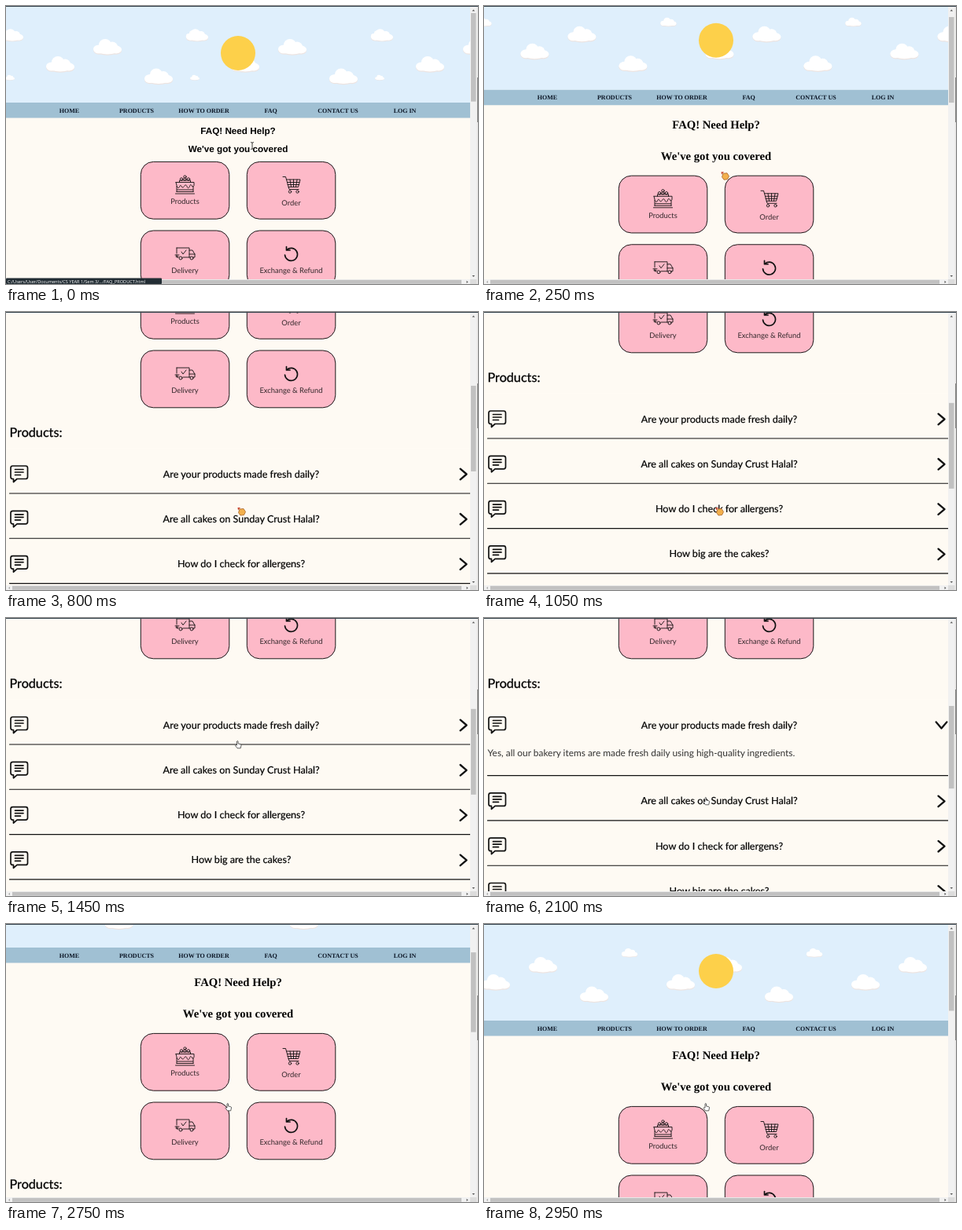
Recreate the animation shown at these times as an HTML page. Size 600 px wide and 354 px high, loop 3000 ms.

```html
<!DOCTYPE html>
<html lang="en">
<head>
<meta charset="utf-8">
<title>Bakery FAQ</title>
<style>
html, body { margin: 0; width: 100%; height: 100%; overflow: hidden; background: #fefaf3; }
svg { display: block; width: 600px; height: 354px; }
text { font-family: Lato, "Open Sans", sans-serif; fill: #111; text-rendering: geometricPrecision; }
.mid { text-anchor: middle; }
.nav { font: bold 8px "Liberation Serif", serif; fill: #0c1626; }
.plain { font: bold 11.7px "Liberation Sans", sans-serif; fill: #000; }
.fancy { font: bold 14.7px "Liberation Serif", serif; fill: #000; }
.label { font-size: 9.4px; fill: #33282b; }
.title { font-size: 16.2px; fill: #000; stroke: #000; stroke-width: .3; }
.question { font-size: 12.6px; fill: #000; stroke: #000; stroke-width: .2; }
.answer { font-size: 11.9px; fill: #333; }
.status { font: 5.6px "Open Sans", sans-serif; fill: #fff; }
.card { fill: #fdb9c8; stroke: #1c1719; stroke-width: 1; }
.line { fill: none; stroke: #111; stroke-linecap: round; stroke-linejoin: round; }
</style>
</head>
<body>
<svg viewBox="0 0 600 354">
  <defs>
    <clipPath id="view"><rect y="1" width="590" height="347"/></clipPath>
    <g id="puff">
      <ellipse cx="-11" cy="3" rx="7" ry="5.500"/>
      <ellipse cx="11" cy="3.500" rx="7" ry="5"/>
      <ellipse cx="-3" cy="-2.500" rx="8" ry="7.500"/>
      <ellipse cx="6" rx="7" ry="6.500"/>
      <ellipse cy="4.500" rx="14" ry="5"/>
    </g>
    <g id="cloud">
      <use href="#puff" y="1.200" fill="#ede4e1"/>
      <use href="#puff" fill="#fff"/>
    </g>
  </defs>
  <rect width="600" height="354" fill="#fefaf3"/>
  <g clip-path="url(#view)">
    <g id="page">
      <rect width="590" height="123" fill="#dfeffc"/>
      <g id="clouds"></g>
      <circle cx="295" cy="60" r="22" fill="#fdd04a"/>
      <rect y="123" width="590" height="19.500" fill="#a0c0d3"/>
      <g id="nav"></g>
      <g id="plain" class="mid">
        <text class="plain" x="295" y="162.500">FAQ! Need Help?</text>
        <text class="plain" x="295" y="185.500">We've got you covered</text>
      </g>
      <g id="fancy" class="mid">
        <text class="fancy" x="295" y="172">FAQ! Need Help?</text>
        <text class="fancy" x="295" y="212">We've got you covered</text>
      </g>
      <g id="body">
        <g id="cards"></g>
        <g class="line" stroke-width=".9">
          <g transform="translate(227.500 261.500)">
            <path d="M-12 11.500H12M-10.500 9H10.500M-10.500 9V2M10.500 9V2M-11.500-3H11.500V1C10.500 3 9 3 8.500 1C7.500-.5 6.500 0 6 2C5 5 3 5 2.500 2C1.500 0 0 0-1 2C-2 4-4 4-4.500 2C-5.500 0-6.500 1-7 3C-8 5-10 4-10.500 1L-11.500-3M-10 6.500H10M-7-3V-5.500H7V-3"/>
            <circle cx="-4.500" cy="-7" r="1.700"/><circle cx="4.500" cy="-7" r="1.700"/><circle cy="-7" r="1.700"/><circle cy="-10" r="1.700"/>
          </g>
          <g transform="translate(363 261.500)">
            <path d="M-11-10H-7.500L-3 6H9M-6.500-6.500H11L8.500 3H-4M-5.500-3H10M-5 0H9.500M-2-6.500L-.5 3M2.500-6.500V3M7-6.500L5.500 3"/>
            <circle cx="-2" cy="9" r="1.700"/><circle cx="7.500" cy="9" r="1.700"/>
          </g>
          <g transform="translate(228 349)">
            <path d="M-11-7H5V5H-3M-11-7V0M-9 5H-11V2M5-4H9L12 1V5H10M5 5H6M5 1H12M-13 2H-8M-12 4H-9M-5-2L-3 1L1-4"/>
            <circle cx="-6" cy="6" r="2"/><circle cx="8" cy="6" r="2"/>
          </g>
          <g transform="translate(362.500 350)" stroke-width="1.700">
            <path d="M-5.500-5.500A8 8 0 1 1-8 1M-6-9.500V-5H-1.500"/>
          </g>
        </g>
        <text class="title" x="4.500" y="429.500">Products:</text>
        <g id="rows"></g>
      </g>
    </g>
  </g>
  <rect width="600" height="1" fill="#35434d"/>
  <rect x="590" y="1" width="8.500" height="353" fill="#f1f1f1"/>
  <rect y="348" width="598" height="6" fill="#f1f1f1"/>
  <rect x="590" y="348" width="8.500" height="6" fill="#dcdcdc"/>
  <rect x="8" y="348.800" width="571" height="5" fill="#c1c1c1"/>
  <rect id="thumb" x="591" width="6.500" fill="#c1c1c1"/>
  <rect x="598.500" y="1" width="1.500" height="353" fill="#e4e4e4"/>
  <rect x="599" y="91" width="1" height="57" fill="#808080"/>
  <path fill="#555" d="M592.500 6.500h3.500l-1.750-2zM592.500 343h3.500l-1.750 2zM585.500 349.700v3.400l2-1.700z"/>
  <path fill="#aaa" d="M5 349.700v3.400l-2-1.700z"/>
  <g id="status">
    <rect y="346.500" width="198" height="7.500" rx="1" fill="#222d34"/>
    <text class="status" x="2" y="352.800">C:/Users/User/Documents/CS YEAR 1/Sem 3/.../FAQ_PRODUCT.html</text>
  </g>
  <g id="cursor">
    <path class="line" stroke-width=".8" d="M-1.500-4.500Q0-4.500 0-3.500Q0-4.500 1.500-4.500M0-3.500V3.500M-1.500 4.500Q0 4.500 0 3.500Q0 4.500 1.500 4.500"/>
    <g>
      <path fill="#c8452f" d="M-4.500-4.500h3.500l-3 3.500z"/>
      <path fill="#f3b04c" stroke="#a8632a" stroke-width=".8" d="M-2-2.500L3-3L5.500 1L3.500 5L-1 5.500L-3.500 2z"/>
    </g>
    <path fill="#fff" stroke="#222" stroke-width=".7" stroke-linejoin="round" d="M-1.500 1V-4Q-.7-5.300 .1-4V-1L3-.4Q4-.2 4 1L3.200 4.800H-1L-3.500 1.500Q-3.300 .2-1.500 1z"/>
  </g>
</svg>
<script>
const $ = id => document.getElementById(id);
const LOOP = 3000, STEP = 50, ROW = 57.3, OPEN = 39.6;

const text = (cls, x, y, s) => `<text class="${cls}" x="${x}" y="${y}">${s}</text>`;
const move = (el, x, y) => el.setAttribute("transform", `translate(${x} ${y})`);
const show = (el, on) => el.style.display = on ? "" : "none";

// Linear interpolation through [time, value] keys
function track(t, keys) {
  const i = keys.findIndex(k => k[0] > t);
  if (i < 0) return keys[keys.length - 1][1];
  if (i === 0) return keys[0][1];
  const [t0, a] = keys[i - 1], [t1, b] = keys[i];
  return a + (b - a) * (t - t0) / (t1 - t0);
}

function ease(t, from, to) {
  const p = Math.min(1, Math.max(0, (t - from) / (to - from)));
  return p * p * (3 - 2 * p);
}

// A strip of [x, y, scale] clouds, repeated across the sky
const sky = clouds => [-1, 0, 1, 2].map(k => clouds.map(([x, y, s]) =>
  `<use href="#cloud" transform="translate(${x + k * 235} ${y}) scale(${s})"/>`).join("")).join("");
$("clouds").innerHTML = sky([[75, 52, 1], [15, 74, 1], [185, 36.5, .56], [140, 89.5, 1]])
  + `<g id="extra">${sky([[189, 37, .78], [186, 91, .33]])}</g>`;

$("nav").innerHTML = [["HOME", 80.5], ["PRODUCTS", 166], ["HOW TO ORDER", 251.5],
  ["FAQ", 336.7], ["CONTACT US", 422], ["LOG IN", 507]]
  .map(([s, x]) => text("nav mid", x, 135.7, s)).join("");

$("cards").innerHTML = [["Products", 171.3, 232.4, 286.4], ["Order", 306.3, 232.4, 287.9],
  ["Delivery", 171.3, 320, 374.4], ["Exchange &amp; Refund", 306.3, 320, 374.4]]
  .map(([s, x, y, base]) => `<rect class="card" x="${x}" y="${y}" width="112.500" height="72.800" rx="16"/>`
    + text("label mid", x + 56.2, base, s)).join("");

// Each row carries a backdrop that hides the closed answer above it
$("rows").innerHTML = [
  ["Are your products made fresh daily?", "Yes, all our bakery items are made fresh daily using high-quality ingredients."],
  ["Are all cakes on Sunday Crust Halal?", "Yes, all our cakes are Halal."],
  ["How do I check for allergens?", ""],
  ["How big are the cakes?", ""],
  ["", ""]
].map(([q, a], i) => `<g class="row">
  <rect y="-32.800" width="590" height="400" fill="#fefaf3"/>
  ${i ? '<path class="line" stroke-width="1.100" d="M4.500-32.800H590"/>' : ""}
  ${q && `<path class="line" stroke-width="1.700" d="M8.500-10.500H25Q27.500-10.500 27.500-8V3.500Q27.500 6 25 6H14L9.500 10V6H8.500Q6 6 6 3.500V-8Q6-10.500 8.500-10.500M11.500-6H22M11.500-2.500H22M11.500 1H18.500"/>
  <path class="line chevron" stroke-width="2.300" d="M-4-6.800L4 0L-4 6.800"/>`}
  ${text("question mid", 299, 4, q)}${text("answer", 4.5, 39.7, a)}</g>`).join("");

const rows = [...document.querySelectorAll(".row")];
const chevrons = [...document.querySelectorAll(".chevron")];
const pointers = [...$("cursor").children];

function draw(t) {
  const early = t < 150;
  const scroll = track(t, [[215, 0], [450, 109], [800, 271], [950, 341], [2335, 341], [2750, 93], [2900, 0]]);
  const open = [ease(t, 1500, 1680), ease(t, 2220, 2340), 0, 0, 0];

  move($("page"), 0, -scroll);
  move($("clouds"), (2950 - t) * .0183, 0);
  show($("extra"), early);
  show($("plain"), early);
  show($("fancy"), !early);
  show($("status"), early);
  move($("body"), 0, early ? -34 : 0);

  let y = 477.5;
  rows.forEach((row, i) => {
    move(row, 0, y);
    y += ROW + OPEN * open[i];
  });
  chevrons.forEach((c, i) => c.setAttribute("transform", `translate(581.500 0) rotate(${90 * open[i]})`));

  const height = early ? 1032 : 1066 + OPEN * (open[0] + open[1]);
  $("thumb").setAttribute("y", 9 + scroll * 334 / height);
  $("thumb").setAttribute("height", 348 * 334 / height);

  move($("cursor"),
    track(t, [[150, 313], [350, 299], [1050, 299], [1350, 295], [1650, 295], [1950, 282.5]]),
    track(t, [[150, 178], [350, 253.5], [1050, 253.5], [1350, 161], [1650, 161], [1950, 233]]));
  const kind = t < 200 ? 0 : t < 1200 ? 1 : 2;
  pointers.forEach((p, i) => show(p, i === kind));
}

const start = performance.now();
function frame() {
  const t = (performance.now() - start) % LOOP;
  draw(Math.floor(t / STEP) * STEP);
  requestAnimationFrame(frame);
}
frame();
</script>
</body>
</html>
```
